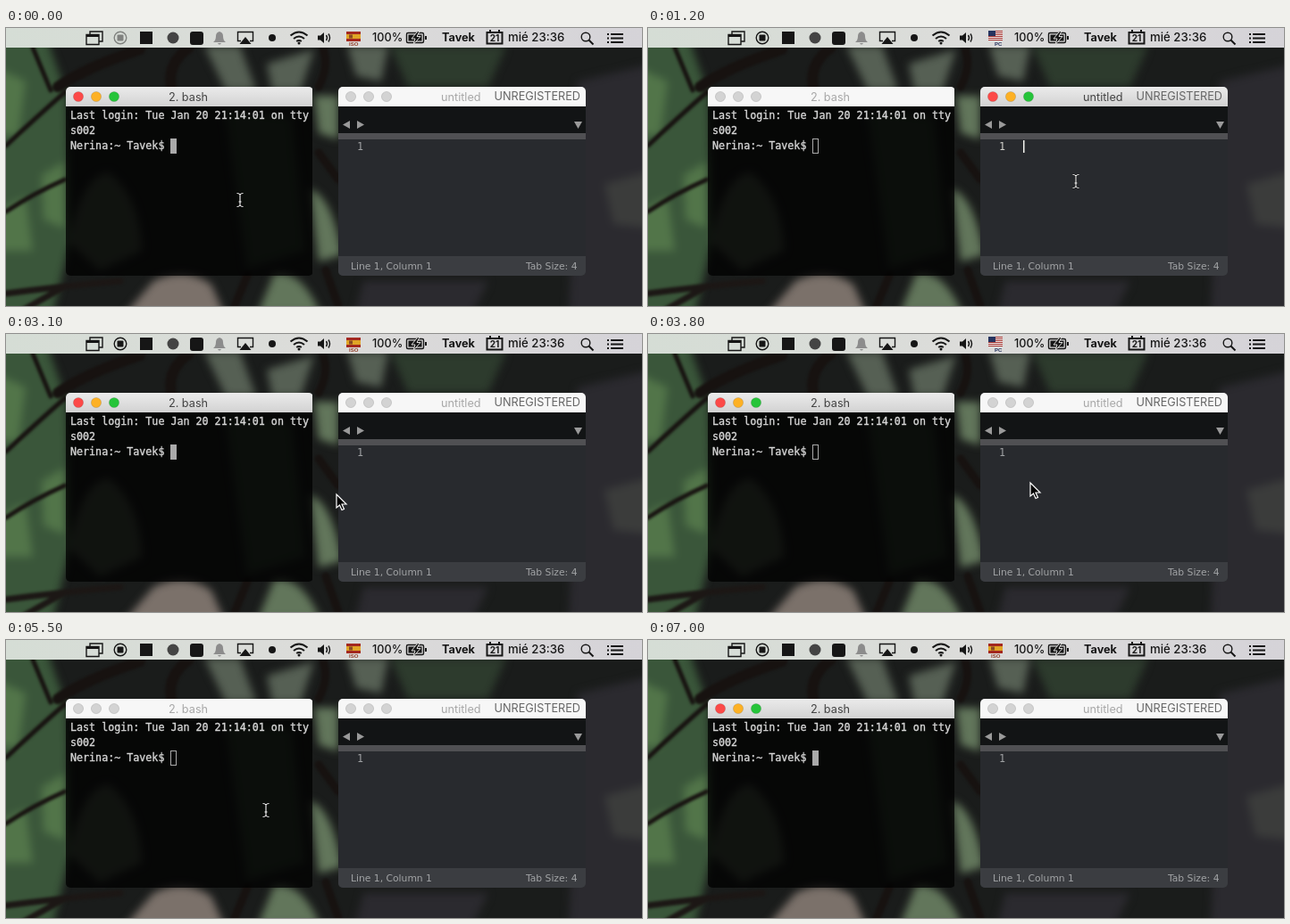
Recreate the animation shown at these times as an HTML page. Size 712x312 px, loop 7100 ms.

```html
<!DOCTYPE html>
<html lang="es">
<head>
<meta charset="utf-8">
<title>Keyboard layout per window</title>
<style>
  html, body { margin: 0; width: 100%; height: 100%; overflow: hidden; background: #111412; }
  svg { display: block; }
  text { font: 12.7px Inter, sans-serif; white-space: pre; }
  .mono text { font: 11.68px "DejaVu Sans Mono", monospace; fill: #d6d6d6; stroke: #d6d6d6; stroke-width: .35; }
  .status text { font: 10.75px "DejaVu Sans", sans-serif; fill: #a2a4a6; }
  .menu text { font-weight: 500; }
  .tiny { font: bold 6px "Liberation Sans", sans-serif; }
  .line { fill: none; stroke: #161616; stroke-width: 1.4; }
  .thick { stroke-width: 2; }
  .window { --red: #d3d3d3; --amber: #d3d3d3; --green: #d3d3d3; }
  .window.on { --red: #fc4a48; --amber: #fdb125; --green: #26c43a; }
  .bar { fill: #f7f7f7; }
  .on .bar { fill: url(#bar); }
  .title { fill: #a8a8a8; }
  .on .title { fill: #444; }
  #number { fill: #9fa1a3; stroke: none; }
  .on #number { fill: #d2d2cc; }
  #caret { visibility: hidden; }
  .on #caret { visibility: visible; }
</style>
</head>
<body>
<svg width="712" height="312" viewBox="0 0 712 312">
  <defs>
    <linearGradient id="bar" x2="0" y2="1"><stop stop-color="#ebebeb"/><stop offset="1" stop-color="#d2d2d2"/></linearGradient>
    <linearGradient id="menu"><stop stop-color="#d5ddd5"/><stop offset=".5" stop-color="#dcdcda"/><stop offset="1" stop-color="#d5d3d8"/></linearGradient>
    <filter id="soft" color-interpolation-filters="sRGB"><feGaussianBlur stdDeviation="5"/></filter>
    <filter id="near" color-interpolation-filters="sRGB"><feGaussianBlur stdDeviation="1.5"/></filter>
    <clipPath id="frame"><rect width="277" height="212" rx="5"/></clipPath>
    <g id="lights" stroke="#000" stroke-opacity=".12">
      <circle cx="14" cy="11" r="5.600" style="fill:var(--red)"/>
      <circle cx="34" cy="11" r="5.600" style="fill:var(--amber)"/>
      <circle cx="54" cy="11" r="5.600" style="fill:var(--green)"/>
    </g>
  </defs>

  <!-- wallpaper -->
  <rect width="712" height="312" fill="#1a1c1b"/>
  <g filter="url(#soft)">
    <path fill="#3a563a" d="M-20 10H45L68 75L72 240L50 330H-20z"/>
    <path fill="#527549" d="M-10 45L22 60L14 120H-10zM40 165L66 150V225L42 215zM-10 205L22 190L30 250H-10z"/>
    <path fill="#454f41" d="M70 240Q85 165 115 162Q150 190 152 250L105 272z"/>
    <path fill="#2d3b2d" d="M245 90L320 100L335 250L270 270zM430 20H560L540 66H450z"/>
    <path fill="#566054" d="M222 20H262L280 70H246zM292 40L345 24L330 70H298zM382 20H428L420 60L392 54z"/>
    <path fill="#62765b" d="M345 76H372V125L350 118zM340 180Q366 190 376 255L350 262zM282 320L300 276Q330 270 352 320z"/>
    <path fill="#7b716a" d="M130 325L165 284Q200 266 230 288L246 325z"/>
    <path fill="#2b2a2f" d="M640 60L725 40V325H630zM400 284H540L520 325H390z"/>
    <path fill="#3b3c3b" d="M670 175L725 160V225L680 220z"/>
  </g>
  <g fill="none" stroke="#171210" stroke-linecap="round" filter="url(#near)">
    <path stroke-width="12" d="M150 24Q90 44 58 66M205 22Q180 40 185 66"/>
    <path stroke-width="5" d="M0 132Q34 100 66 72M0 206Q30 186 66 170M30 22L50 70"/>
    <path stroke-width="7" stroke="#1c1715" d="M0 298Q60 290 128 284M20 316L66 290"/>
    <path stroke-width="9" d="M355 22Q362 44 350 66M350 140L372 170M256 312L270 278M358 272L372 312"/>
  </g>

  <!-- menu bar -->
  <rect width="712" height="22" fill="url(#menu)"/>
  <g class="menu" fill="#161616">
    <path class="line" d="M94 7V4h14v11h-4M90 7.500h14v11H90z"/><path d="M90 7h14v3H90z"/>
    <g id="record"><circle class="line" cx="128" cy="11" r="6.800"/><rect x="124.500" y="7.500" width="7" height="7" rx="1"/></g>
    <rect x="150" y="4" width="14" height="14"/>
    <circle cx="187" cy="11" r="6.500" fill="#444"/>
    <rect x="206" y="4" width="15" height="15" rx="3"/>
    <path fill="#8c8c8c" d="M232 16q3-2 3-7q0-4 4-5q4 1 4 5q0 5 3 7zM237 17h4q-2 3-4 0"/>
    <path class="line" d="M263 14.500h-3.500v-10h17v10H273"/><path d="M268 10l6.500 8h-13z"/>
    <circle cx="298" cy="11" r="4"/>
    <path class="line thick" d="M318.500 8.500q9.500-8 19 0M322 12q6-5 12 0M325.200 15q2.800-2 5.600 0"/><circle cx="328" cy="17" r="1.500"/>
    <path d="M349 8.500h3l4-3.500v12l-4-3.500h-3z"/><path class="line" d="M358.500 8q2 3 0 6M361 6.500q3 4.500 0 9"/>
    <text x="410" y="15">100%</text>
    <rect class="line" x="448.500" y="5.500" width="19" height="11" rx="1.500"/><path d="M450.500 7.500h15v7h-15zM469 9h2v4h-2z"/>
    <path stroke="#dcdcda" d="M461 3.500l-7 8.500h4l-2 6.500l8-9h-4l3-6z"/>
    <text x="488" y="15" style="font-weight:700">Tavek</text>
    <path class="line thick" d="M538.500 5h17v12.500h-17zM542 2v3M552 2v3"/>
    <text x="547" y="15" text-anchor="middle" style="font-size:10px;font-weight:700">21</text>
    <text x="562" y="15" style="font-size:13.2px">mié 23:36</text>
    <circle class="line" cx="649" cy="10" r="4.800"/><path class="line thick" d="M652.500 13.500l5 5"/>
    <path class="line thick" d="M673 7h2m2 0h14M673 11.500h2m2 0h14M673 16h2m2 0h14"/>
  </g>
  <g id="us">
    <path fill="#eee" d="M381 3h16v11h-16z"/>
    <path stroke="#a8322e" d="M381 3.500h16m-16 2h16m-16 2h16m-16 2h16m-16 2h16m-16 2h16"/>
    <path fill="#26345f" d="M381 3h8v6h-8z"/>
    <text class="tiny" x="388" y="19.500" fill="#26345f">PC</text>
  </g>
  <g id="es">
    <path fill="#a3281f" d="M381 4h16v11h-16z"/><path fill="#e0a526" d="M381 7h16v5h-16z"/>
    <path fill="#8a4a24" d="M384 7.500h4v4h-4z"/>
    <text class="tiny" x="384" y="20" fill="#93402a">ISO</text>
  </g>

  <!-- terminal -->
  <g id="terminal" class="window" transform="translate(67 66)">
    <g clip-path="url(#frame)">
      <rect width="276" height="212" fill="#000" opacity=".76"/>
      <rect class="bar" width="276" height="22"/>
    </g>
    <use href="#lights"/>
    <text class="title" x="137" y="15.500" text-anchor="middle">2. bash</text>
    <g class="mono">
      <text x="5" y="36">Last login: Tue Jan 20 21:14:01 on tty</text>
      <text x="5" y="53">s002</text>
      <text x="5" y="70">Nerina:~ Tavek$</text>
    </g>
    <rect id="block" x="117.500" y="58.500" width="6" height="16" stroke="#aaa"/>
  </g>

  <!-- editor -->
  <g id="editor" class="window" transform="translate(372 66)">
    <g clip-path="url(#frame)">
      <rect width="277" height="212" fill="#282a2e"/>
      <rect class="bar" width="277" height="22"/>
      <path fill="#121415" d="M0 22h277v30H0z"/>
      <path fill="#505053" d="M0 52h277v7H0z"/>
      <path fill="#3b3d41" d="M0 190h277v22H0z"/>
    </g>
    <use href="#lights"/>
    <text class="title" x="115" y="15.500">untitled</text>
    <text x="271" y="15" text-anchor="end" fill="#666">UNREGISTERED</text>
    <path fill="#9a9a9a" d="M13 38v9l-8-4.500zM21 38v9l8-4.500zM264 39h9l-4.500 8z"/>
    <g class="mono"><text id="number" x="21" y="71">1</text></g>
    <path id="caret" fill="#f4f4f0" d="M48 60h1.500v14H48z"/>
    <g class="status">
      <text x="14" y="205">Line 1, Column 1</text>
      <text x="267.500" y="205" text-anchor="end">Tab Size: 4</text>
    </g>
  </g>

  <!-- pointer -->
  <g id="pointer">
    <g id="rings" fill="none" stroke="#fff" stroke-width="1.300"><circle cy="2" r="23"/><circle cy="2" r="19"/></g>
    <path id="arrow" fill="#000" stroke="#fff" stroke-width="1.200" d="M0 0V15L3.500 12L6 17.500L8.500 16.500L6 11H11Z"/>
    <g id="beam" fill="none">
      <path id="stem" d="M-3.500-7.500Q-1-7.500 0-6Q1-7.500 3.500-7.500M0-6V6M-3.500 7.500Q-1 7.500 0 6Q1 7.500 3.500 7.500M-1.500 2H1.500"
        style="stroke:inherit;stroke-width:inherit"/>
    </g>
  </g>
</svg>
<script>
const $ = id => document.getElementById(id);
const LOOP = 7100, STEP = 100;

// The text pointer is a white line over a wider dark one
$('beam').innerHTML = ['#000" stroke-width="2.2', '#fff" stroke-width="1.1']
  .map(stroke => `<path stroke="${stroke}" d="${$('stem').getAttribute('d')}"/>`).join('');

// Pointer route: time, x, y
const route = [
  [0, 262, 193], [300, 262, 193], [800, 479, 172], [1600, 479, 172], [2200, 282, 206],
  [2600, 282, 206], [3100, 370, 180], [3500, 428, 167], [4500, 428, 167], [5200, 291, 191],
  [5900, 291, 191], [6500, 262, 193], [LOOP, 262, 193]
];

// True inside any of the [from, to) spans
const within = (t, ...spans) => spans.some(([from, to]) => t >= from && t < to);
const show = (id, on) => $(id).style.display = on ? '' : 'none';

function pointerAt(t) {
  const i = route.findIndex(key => key[0] > t);
  const [t0, x0, y0] = route[i - 1], [t1, x1, y1] = route[i];
  const u = (t - t0) / (t1 - t0);
  return [x0 + (x1 - x0) * u, y0 + (y1 - y0) * u];
}

function draw(t) {
  const us = within(t, [900, 2200], [3700, 5300]);
  const arrow = within(t, [300, 1000], [1700, 2500], [2700, 3900], [4600, 5400]);
  const focused = !within(t, [800, 2400], [3700, 5600]);

  $('terminal').classList.toggle('on', !within(t, [900, 2400], [3900, 5600]));
  $('editor').classList.toggle('on', within(t, [1000, 2400], [3900, 5400]));
  $('block').setAttribute('fill', focused ? '#aaa' : 'none');
  $('record').setAttribute('opacity', t < STEP ? .45 : 1);
  show('us', us);
  show('es', !us);
  show('arrow', arrow);
  show('beam', !arrow);
  show('rings', within(t, [800, 1000], [2200, 2400], [3600, 3800], [5300, 5500]));
  show('pointer', t < 7000);
  $('pointer').setAttribute('transform', `translate(${pointerAt(t)})`);
}

function tick() {
  draw(Math.floor(performance.now() % LOOP / STEP) * STEP);
  requestAnimationFrame(tick);
}
tick();
</script>
</body>
</html>
```
